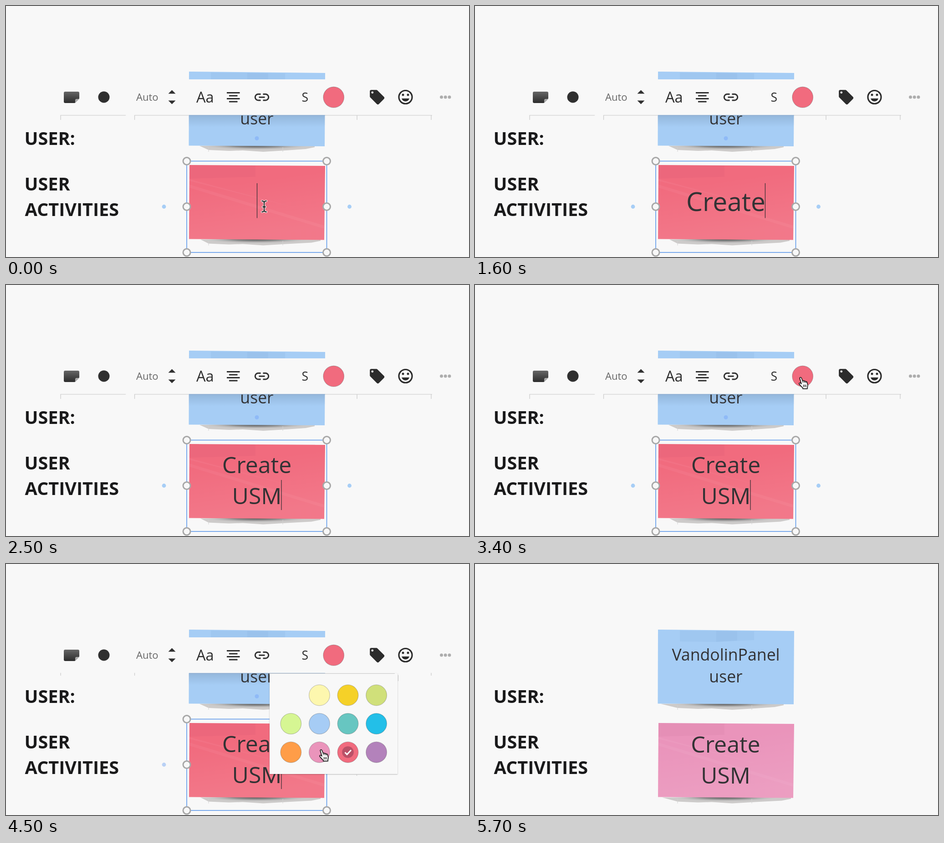
These frames come from a looping animation (1017x551 px, 5800 ms). An HTML page:

```html
<!DOCTYPE html>
<html lang="en">
<head>
<meta charset="utf-8">
<title>Sticky note recolouring</title>
<style>
  html, body { margin: 0; width: 100%; height: 100%; overflow: hidden; background: #f8f8f8; }
  svg { display: block; width: 1017px; height: 551px; font-family: "Open Sans", sans-serif; }
  .heading { font-weight: 700; font-size: 39.6px; fill: #1a1a1b; }
  .note { text-anchor: middle; fill: #323234; }
  .handle { fill: #f8f8f8; stroke: #a8a8a8; stroke-width: 3; }
  .edge { stroke: #c9c9c9; stroke-width: 1.2; fill: none; }
  .pointer { stroke-linejoin: round; stroke-linecap: round; }
</style>
</head>
<body>
<svg viewBox="0 0 1017 551" xmlns="http://www.w3.org/2000/svg">
  <defs>
    <linearGradient id="sheen" x1="0" y1="0" x2=".25" y2="1">
      <stop offset=".3" stop-color="#fff" stop-opacity="0"/>
      <stop offset="1" stop-color="#fff" stop-opacity=".09"/>
    </linearGradient>
    <linearGradient id="barShade" x1="0" y1="0" x2="0" y2="1">
      <stop offset="0" stop-color="#345" stop-opacity=".16"/>
      <stop offset="1" stop-color="#345" stop-opacity="0"/>
    </linearGradient>
    <linearGradient id="iconFill" x1="0" y1="0" x2="0" y2="1">
      <stop offset="0" stop-color="#666"/>
      <stop offset="1" stop-color="#2c2c2c"/>
    </linearGradient>
    <radialGradient id="core" cx=".5" cy="0" r=".5" gradientTransform="translate(0 0) scale(1 1.9)">
      <stop offset="0" stop-color="#555"/>
      <stop offset=".45" stop-color="#8c8c8c"/>
      <stop offset="1" stop-color="#cfcfcf" stop-opacity="0"/>
    </radialGradient>
    <filter id="soft" x="-10%" y="-10%" width="120%" height="120%">
      <feDropShadow dx="0" dy="1" stdDeviation="1" flood-color="#000" flood-opacity=".28"/>
    </filter>
  </defs>

  <text class="heading" x="40.5" y="305">USER:</text>
  <text class="heading" x="40.5" y="405">USER</text>
  <text class="heading" x="41.5" y="460.500">ACTIVITIES</text>

  <g id="blueShadow"></g>
  <path d="M402 144L701 147 700 308 401.500 306.500Z" fill="#a6cdf5"/>
  <path d="M450 146L613 148V167L530 171 450 170Z" fill="#4a78aa" opacity=".07"/>
  <path d="M530 147L576 147.500V168L530 171Z" fill="#4a78aa" opacity=".06"/>
  <text class="note" x="551" y="211.500" font-size="35.6">VandolinPanel</text>
  <text class="note" x="551" y="260" font-size="35.6">user</text>

  <g id="activityShadow"></g>
  <path id="activityNote" d="M403 349L701 351 699 513.500 402 511.500Z"/>
  <path d="M403 349L701 351 699 513.500 402 511.500Z" fill="url(#sheen)"/>
  <path d="M403 349L548 350V375L403 379Z" fill="#702040" opacity=".045"/>
  <path d="M403 392L699 482V489L403 399ZM403 380L640 444 403 384Z" fill="#fff" opacity=".045"/>
  <g id="activityText">
    <text id="lineOne" class="note"/>
    <text id="lineTwo" class="note"/>
  </g>
  <path id="caret" stroke="#3a3036" stroke-width="1.3"/>

  <g id="selection">
    <rect x="397" y="340.500" width="307.500" height="200.500" fill="none" stroke="#5d98ea" stroke-width="1.6"/>
    <g id="handles"></g>
    <circle id="leftDot" cx="347" cy="440.500" r="4.400"/>
    <circle cx="754.500" cy="440.500" r="4.400" fill="#a7cef6"/>
    <circle id="topDot" cx="551" cy="290.500" r="4.500" fill="#8fbaf7"/>

    <rect x="81" y="161" width="936" height="78.500" fill="#f8f8f8"/>
    <rect x="401.500" y="240" width="299" height="26" fill="url(#barShade)"/>
    <path d="M402 240H701" stroke="#87a4c4"/>
    <path id="barEdge" class="edge" d="M263 240H120V250M282.500 250V240H402M701 240H936M771 240V250M934 240V250"/>
    <path id="barTicks" class="edge" d="M120 239V245M282.500 239V245M934 239V245"/>

    <path d="M130 188H158Q161 188 161 191V203L151 213H130Q127 213 127 210V191Q127 188 130 188Z" fill="url(#iconFill)"/>
    <path d="M161 204L152 213V207Q152 204 155 204Z" fill="#aaa"/>
    <circle cx="215" cy="200" r="12.500" fill="#303030"/>
    <text x="286" y="208" font-size="22" fill="#666">Auto</text>
    <path d="M356.500 192.500L364.500 184.500 372.500 192.500ZM356.500 207.500H372.500L364.500 215.500Z" fill="#303030"/>
    <text x="418" y="212" font-size="32.500" fill="#2c2c2c">Aa</text>
    <path d="M485 190.500H513.500M490 197H508.500M485 203.500H513.500M490 210H508.500" stroke="#303030" stroke-width="3"/>
    <path d="M559.500 193.500H554A6.700 6.700 0 0 0 554 207H559.500M564.500 193.500H570A6.700 6.700 0 0 1 570 207H564.500M555.500 200.300H568.500"
          fill="none" stroke="#303030" stroke-width="3"/>
    <text x="649.500" y="210" font-size="26.500" fill="#2c2c2c">S</text>
    <g id="currentColour"></g>
    <path transform="translate(796 181) scale(1.6)" fill="#2c2c2c" fill-rule="evenodd"
          d="M21.400 11.600l-9-9Q11.800 2 11 2H4Q2 2 2 4v7q0 .8.600 1.400l9 9q1.400 1.200 2.800 0l7-7q1.200-1.400 0-2.800ZM5.500 7a1.500 1.500 0 1 1 0-3 1.500 1.500 0 0 1 0 3Z"/>
    <circle cx="877.500" cy="200" r="14.500" fill="none" stroke="#2c2c2c" stroke-width="3.200"/>
    <path d="M869 203H886Q883.500 209.500 877.500 209.500T869 203Z" fill="#2c2c2c"/>
    <circle cx="872" cy="195" r="2.500" fill="#2c2c2c"/>
    <circle cx="883" cy="195" r="2.500" fill="#2c2c2c"/>
    <path d="M956.500 200h.01M965.200 200h.01M974 200h.01" stroke="#adadad" stroke-width="7" stroke-linecap="round"/>
  </g>

  <g id="palette">
    <rect x="579" y="240" width="281" height="221" fill="#f8f8f8" filter="url(#soft)"/>
    <path class="edge" d="M579 240.500H854M861.500 244V257M770.500 461V465"/>
    <g id="swatches"></g>
    <circle cx="751" cy="413" r="12.800" fill="#ba5167"/>
    <path d="M744.500 413.500L749 418 758 408.500" fill="none" stroke="#fff" stroke-width="3"/>
  </g>

  <g id="beam" class="pointer" fill="none">
    <path id="beamShape" d="M-5-12Q0-12 0-8Q0-12 5-12M0-8V8M-5 12Q0 12 0 8Q0 12 5 12M-3 1H3" stroke="#fff" stroke-width="4"/>
    <use href="#beamShape" style="stroke:#111"/>
    <path d="M-5-12Q0-12 0-8Q0-12 5-12M0-8V8M-5 12Q0 12 0 8Q0 12 5 12M-3 1H3" stroke="#111" stroke-width="1.900"/>
  </g>
  <g id="hand" class="pointer" filter="url(#soft)">
    <path d="M2.500 3C1.500.500 5 0 6 2L8.500 8.500C9.500 7.500 11.500 8 12 9.200 13 8.400 15 9 15.300 10.300 16.500 9.700 18 10.300 18.400 11.800L19.600 16.500C20.200 19 19.600 20.500 19 22V25.500H9V23.500C6 21.500 4 18.500 1.500 15.500 0 13.500 2.200 12 4 13.400L6 15Z"
          fill="#fff" stroke="#111" stroke-width="1.500"/>
    <path d="M8.500 8.500L9.500 12M12 9.200L12.800 12.300M15.300 10.300L16 12.800M10.500 17V21.500M13.300 17V21.500M16 17V21.500" fill="none" stroke="#111" stroke-width="1.200"/>
  </g>
  <path id="arrow" class="pointer" filter="url(#soft)" d="M0 0V22L5 17.500 8.500 26 12.500 24.300 9 16H15.500Z" fill="#111" stroke="#fff" stroke-width="1.400"/>
</svg>

<script>
const LOOP = 5800, STEP = 100;
const RED = "#f16b7e", PINK = "#ea94bb";
const PALETTE_OPEN = 3600, RECOLOUR = 4600, DESELECT = 5200, POINTER_GONE = 5400;
const KEY_TIMES = [300, 600, 800, 1000, 1200, 1400, 1700, 1800, 2000, 2200];
const PHRASE = "Create USM";

// time, x, y
const POINTER_PATH = [
  [0, 567, 440], [2700, 567, 440], [3300, 711, 202], [3900, 711, 202],
  [4400, 688, 407], [4600, 688, 407], [5000, 773, 478], [LOOP, 773, 478]
];

const $ = id => document.getElementById(id);
const show = (id, on) => $(id).setAttribute("display", on ? "inline" : "none");
const set = (id, attrs) => {
  for (const key in attrs) $(id).setAttribute(key, attrs[key]);
};

const swatch = (x, y, fill) =>
  `<circle cx="${x}" cy="${y}" r="22.8" fill="${fill}" stroke="#333" stroke-opacity=".25" stroke-width="1.3"
    style="paint-order:fill"/>`;

function shadow(y, left, right) {
  return `<path d="M${left} ${y}L445 ${y + 9} 490 ${y + 11} 520 ${y + 10} 565 ${y + 13} 615 ${y + 10}
      ${right - 20} ${y + 7} ${right} ${y + 3} ${right} ${y}Z" fill="#cdcbca"/>
    <rect x="428" y="${y - 1}" width="245" height="11" fill="url(#core)"/>
    <path d="M445 ${y + 3}V${y + 13}M608 ${y + 3}V${y + 13}" stroke="#d2d2d2"/>`;
}

function buildPalette() {
  const rows = [
    [null, "#fdf7ae", "#f5d128", "#d0e07a"],
    ["#d6f693", "#a6ccf5", "#67c6c1", "#23bfe8"],
    ["#ff9d48", PINK, RED, "#b382bb"]
  ];
  $("swatches").innerHTML = rows.flatMap((row, r) =>
    row.map((fill, c) => fill ? swatch(625.8 + c * 62.6, 288 + r * 62.6, fill) : "")).join("");
}

function buildHandles() {
  $("handles").innerHTML = [340.5, 440.5, 541].flatMap(y =>
    [397, 704.5].map(x => `<circle class="handle" cx="${x}" cy="${y}" r="8"/>`)).join("");
}

function pointerAt(t) {
  const i = POINTER_PATH.findIndex(p => p[0] > t);
  const [t0, x0, y0] = POINTER_PATH[i - 1], [t1, x1, y1] = POINTER_PATH[i];
  const k = (t - t0) / (t1 - t0), e = k * k * (3 - 2 * k);
  return [x0 + (x1 - x0) * e, y0 + (y1 - y0) * e];
}

function drawText(t) {
  const typed = PHRASE.slice(0, KEY_TIMES.filter(k => k <= t).length);
  const [first, second = ""] = typed.split(" ");
  const size = second ? 50 : 57;
  set("lineOne", { x: 551, y: second ? 413 : 449.5, "font-size": size });
  set("lineTwo", { x: 551, y: 481, "font-size": size });
  $("lineOne").textContent = first;
  $("lineTwo").textContent = second;

  const line = $(second ? "lineTwo" : "lineOne");
  const width = (second || first) ? line.getComputedTextLength() : 0;
  const x = 551.5 + Math.max(0, width / 2 - 1);
  set("caret", { d: second ? `M${x} 428V494` : `M${x} 389V465.5` });
  show("caret", t < RECOLOUR);
}

function drawPointer(t) {
  const [x, y] = pointerAt(t);
  const resting = t < 300 || t >= 2600;
  const kind = t < 3000 ? "beam" : t < 4800 ? "hand" : "arrow";
  for (const id of ["beam", "hand", "arrow"]) {
    show(id, id === kind && resting && t < POINTER_GONE);
    set(id, { transform: `translate(${x} ${y})` });
  }
}

function render(t) {
  const colour = t < RECOLOUR ? RED : PINK;
  const selected = t < DESELECT;
  const open = t >= PALETTE_OPEN && t < RECOLOUR;

  $("activityNote").setAttribute("fill", colour);
  $("currentColour").innerHTML = swatch(719.7, 200.3, colour);
  $("blueShadow").innerHTML = shadow(307, selected ? 425 : 408, 678);
  $("activityShadow").innerHTML = shadow(512.5, selected ? 427 : 411, selected ? 691 : 694);
  set("activityText", { transform: selected ? "" : "translate(-.6 1)" });
  set("leftDot", { fill: open ? "#b9d1f5" : "#a7cef6" });
  set("topDot", t >= 4900
    ? { stroke: "#e4eefb", "stroke-width": 1.3, "stroke-dasharray": "2 1" }
    : { stroke: "none" });

  show("selection", selected);
  show("palette", open);
  show("barEdge", !open);
  show("barTicks", open);
  drawText(t);
  drawPointer(t);
}

buildPalette();
buildHandles();
const start = performance.now();
function tick() {
  const t = (performance.now() - start) % LOOP;
  render(Math.floor(t / STEP) * STEP);
  requestAnimationFrame(tick);
}
tick();
</script>
</body>
</html>
```
